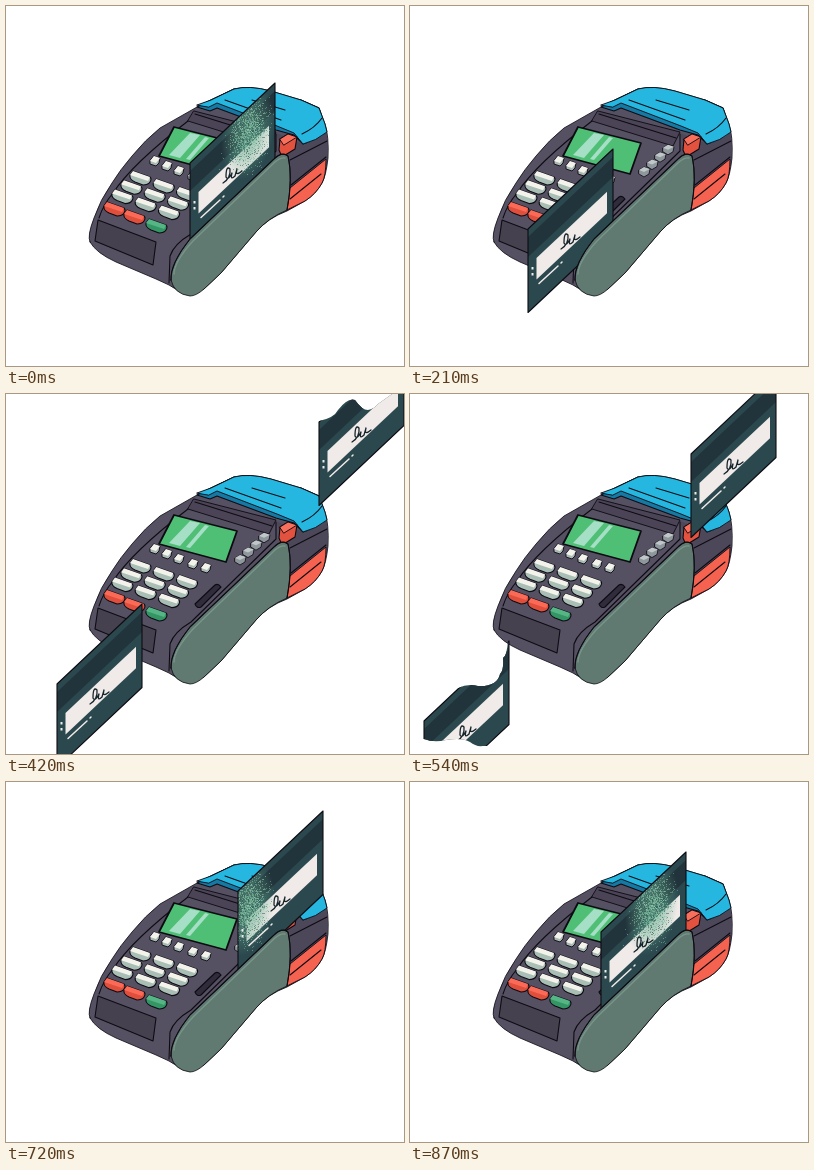
Write an HTML page with a canvas that moves like this. It is 398x360 px and loops after 900 ms.

```html
<!DOCTYPE html>
<html lang="en">
<head>
<meta charset="utf-8">
<title>Card swipe</title>
<style>
html, body { margin: 0; width: 100%; height: 100%; overflow: hidden; background: #fff; }
canvas { display: block; }
</style>
</head>
<body>
<canvas id="stage" width="398" height="360"></canvas>
<script>
const ctx = document.getElementById('stage').getContext('2d');
const INK = '#0d0b12', LOOP = 900, STEP = 30;
ctx.lineJoin = ctx.lineCap = 'round';

function shape(d, fill, stroke = INK, width = 1.1) {
  const path = new Path2D(d);
  if (fill) { ctx.fillStyle = fill; ctx.fill(path); }
  if (stroke) { ctx.strokeStyle = stroke; ctx.lineWidth = width; ctx.stroke(path); }
}

function at(x, y, draw) {
  ctx.save();
  ctx.translate(x, y);
  draw();
  ctx.restore();
}

function key(x, y, top, side) {
  at(x, y, () => {
    shape('M-7-7L10-1Q12 1 10 4Q8 7 3 7L-5 4Q-11 1-10-3Z', side);
    shape('M-7-7L10-1L8 3L-10-3Z', top, null);
  });
}

function body() {
  shape('M84 236Q81 230 88 212Q94 194 106 177Q114 164 126 150Q139 134 154 122L191 101L205 94L228 83Q243 79 265 85L295 94L313 102L319 118Q323 130 322 152Q320 170 316 177Q310 188 299 195L281 205Q262 212 250 226L215 267L198 283Q180 292 163 279L150 273L110 256Q90 247 84 236Z', '#565063', INK, .8);

  // right flank
  shape('M270 127L297 138L320 125Q323 140 321 154L281 186L276 147Z', '#4d475a', null);
  shape('M284 182L320 153Q320 170 316 177Q310 188 299 195L281 204Z', '#f5624f', INK, .9);
  shape('M284 193L315 168M284 154L321 135M285 179L320 151', null);

  // paper cover
  shape('M191 101L205 94L228 83L295 94L313 102L320 125Q310 134 297 138L288 129L270 124L211 102L204 105Z', '#1679a3');
  shape('M191 99L205 94L228 83Q243 79 265 85L295 94L313 102L319 118L321 126Q310 135 297 138L288 127L271 120L211 97L203 101Z', '#25b7e0', INK, .9);
  shape('M219 94L275 114M246 94L279 104M296 128Q309 122 316 112', null);

  // top face
  shape('M188 105L270 126L263 140L182 115Z', '#4a4456', INK, .9);
  shape('M189 108L266 132M270 128L270 145L185 228Q168 238 164 250L163 277M182 115Q126 158 107 187Q97 199 93 212', null);
  shape('M168 121L231 137L220 168L153 150Z', '#50bf76', INK, 1.8);
  shape('M184 127L194 129L174 152L163 149ZM199 131L203 132L184 154L180 153Z', '#a5dfc6', null);
  shape('M189 210L209 191Q212 189 215 193L195 213Q191 215 189 210Z', '#312c3c');
  for (let i = 0; i < 4; i++) {
    at(234 + i * 8, 166 - i * 7.4, () => {
      shape('M-5-2L0-5L6-3L5 2L0 5L-5 2Z', '#8e979b', INK, .8);
      shape('M-5-2L0-5L6-3L0 0Z', '#c0c7c8', null);
    });
  }

  // keypad
  for (const [x, y] of [[149, 155], [161, 160], [173, 165], [187, 170], [200, 174]]) {
    at(x, y, () => {
      shape('M-1-5L5-3L4 2L1 5L-5 3L-5 0Z', '#a9b9b3', INK, .9);
      shape('M-1-5L5-3L1 2L-5 0Z', '#f3f3ec', null);
    });
  }
  for (let row = 0; row < 3; row++)
    for (let col = 0; col < 3; col++)
      key(134 - row * 9 + col * 23.3, 172 + row * 9.3 + col * 8, '#f3f3ec', '#a9bfb6');
  key(108, 203, '#fb6957', '#e04f3c');
  key(128, 211, '#fb6957', '#e04f3c');
  key(150, 220, '#56b585', '#349565');
  shape('M92 214L150 236L147 259L89 235Z', '#46414f');

  // release button
  shape('M274 133L282 128L291 131L289 143L276 151L273 144Z', '#e2523e');
  shape('M274 133L282 128L291 131L278 139Z', '#f8705b', INK, .9);
}

function panel() {
  shape('M165 274Q164 258 184 233L268 153Q276 145 282 150Q287 172 281 204Q262 212 250 226L215 267L198 283Q190 290 184 290Q168 288 165 274Z', '#607a71', INK, .8);
  shape('M165 274Q164 258 184 233L268 153Q276 145 282 150Q287 172 281 204', null);
  shape('M168 268Q168 256 187 235L269 156Q275 151 279 152', null, '#78958a', 1.3);
}

// Grainy light that stays put while the card slides through it.
let seed = 7;
const rnd = () => (seed = seed * 16807 % 2147483647) / 2147483647;
const bell = () => (rnd() + rnd() + rnd()) / 1.5 - 1;
const spot = (u, v) => [242 + u * 25 + v * 10, 127 + u * 5 - v * 46];
const grains = Array.from({ length: 1500 }, () => [...spot(bell(), bell()), rnd()]);

function sheen() {
  ctx.save();
  ctx.transform(25, 5, 10, -46, 242, 127);
  const glow = ctx.createRadialGradient(0, 0, 0, 0, 0, 1);
  glow.addColorStop(0, 'rgba(112,180,150,.75)');
  glow.addColorStop(.45, 'rgba(104,170,142,.45)');
  glow.addColorStop(1, 'rgba(104,170,142,0)');
  ctx.fillStyle = glow;
  ctx.fillRect(-1, -1, 2, 2);
  ctx.restore();
  ctx.globalAlpha = .5;
  for (const [x, y, tone] of grains) {
    ctx.fillStyle = tone < .55 ? '#78b99c' : tone < .75 ? '#a3d0b9' : '#2d5550';
    ctx.fillRect(Math.round(x), Math.round(y), 1, 1);
  }
  ctx.globalAlpha = 1;
}

// Points are relative to the top left corner; the long sides rise 80 over 85.
const slab = (u0, u1, v0, v1) => {
  const y = (u, v) => v - u * 80 / 85;
  return `M${u0} ${y(u0, v0)}L${u1} ${y(u1, v0)}L${u1} ${y(u1, v1)}L${u0} ${y(u0, v1)}Z`;
};
const CARD = slab(0, 85, 0, 83.5);

function card(x, y) {
  at(x, y, () => {
    shape(CARD, '#2b484e', null);
    shape(slab(0, 85, 8, 28), '#21333b', null);
    shape(slab(8.5, 79, 37, 58.5), '#f0ebe9', null);
    ctx.save();
    ctx.clip(new Path2D(CARD));
    ctx.translate(-x, -y);
    sheen();
    ctx.restore();
    shape('M33 20Q41 15 40 6Q36 2 36 14Q38 18 42 10Q40 18 45 13L47 6Q45 14 52 8', null, '#16242b', 1.3);
    shape('M11 54.5L30 37M33 34L34 33', null, '#f0ebe9', 1.5);
    ctx.fillStyle = '#f0ebe9';
    ctx.fillRect(3.5, 38, 2, 2.5);
    ctx.fillRect(3.5, 44, 2, 2.5);
    shape(CARD, null);
  });
}

function clipShifted(d, dy) {
  ctx.translate(0, dy);
  ctx.clip(new Path2D(d));
  ctx.translate(0, -dy);
}

// Time and x of the right edge, from entry to exit.
const TRACK = [[360, 414], [420, 398], [540, 366], [720, 317], [870, 276], [900, 269],
  [1110, 203], [1230, 165], [1320, 136], [1440, 99]];

function slide(t) {
  const i = TRACK.findIndex(([end]) => t <= end);
  if (i < 0 || t < TRACK[0][0]) return;
  const [t1, x1] = TRACK[i], [t0, x0] = TRACK[Math.max(i - 1, 0)];
  const right = t1 === t0 ? x1 : x0 + (x1 - x0) * (t - t0) / (t1 - t0);
  ctx.save();
  if (t < 480)
    clipShifted('M300 34L313 27Q328 24 332 16Q342 3 349 6Q356 16 362 16Q368 15 372 10L400-10V500H300Z', (420 - t) * .4);
  if (t > 1360) {
    const d = (1440 - t) * .6;
    clipShifted('M0 288L48 294Q58 289 68 292Q87 293 90 280Q94 276 93 264Q97 262 98 246H120V500H0Z', -d);
    clipShifted('M0 345H14Q24 349 36 346Q52 343 60 348Q66 353 73 352H150V0H0Z', d);
  }
  card(right - 85, 426 - right);
  ctx.restore();
}

function frame(now) {
  const t = Math.floor(now % LOOP / STEP) * STEP;
  ctx.fillStyle = '#fff';
  ctx.fillRect(0, 0, 398, 360);
  body();
  slide(t);
  slide(t + LOOP);
  panel();
  requestAnimationFrame(() => frame(performance.now()));
}
frame(0);
</script>
</body>
</html>
```
